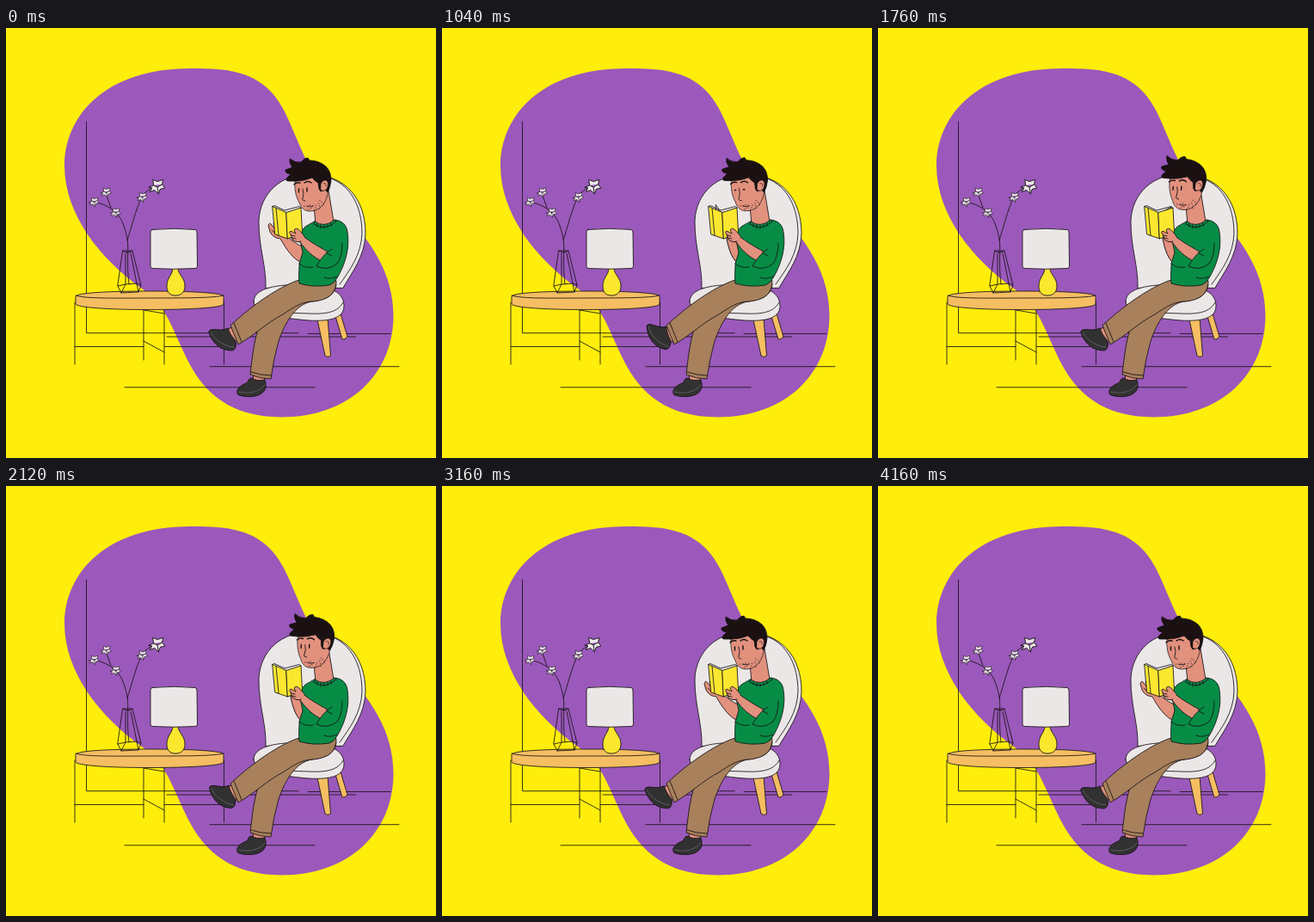
An HTML page that plays this animation: 500x500 px, repeating every 5040 ms.

```html
<!DOCTYPE html>
<html lang="en">
<head>
<meta charset="utf-8">
<title>Reading chair</title>
<style>
  html, body { margin: 0; height: 100%; overflow: hidden; background: #ffed0b; }
  svg { display: block; width: 100%; height: 100%; stroke: #161216; stroke-width: .85; stroke-linejoin: round; stroke-linecap: round; fill: none; }
  .white { fill: #ebe7e7; }
  .wood { fill: #f5be62; }
  .yellow { fill: #fbe72e; }
  .skin { fill: #e2917d; }
  .green { fill: #078c46; }
  .brown { fill: #a8805c; }
  .shoe { fill: #323132; }
  .hair { fill: #1b1112; }
</style>
</head>
<body>
<svg viewBox="0 0 500 500">
  <path fill="#9b59bb" stroke="none" d="M68 160C68 105 112 47 215 47C240 47 254 48 266 51C301 59 317 80 329 108C347 149 355 174 386 207C425 248 450.500 285 450.500 335C450 402 400 452.500 320 452.500C262 452 231 426 211 386C190 342 187 325 158 303C110 269 68 217 68 160Z"/>

  <!-- room lines -->
  <path d="M93.500 109V354.700H340M351 355.500H447M187 359H407M237 393.700H457M138 417.800H359"/>

  <!-- table -->
  <path d="M80 319V391M160 327V386M184 326V391M253.500 319V391M80 370.500H160M184 370.500H253.500M160 364L184 377M160 328L184 332"/>
  <path class="wood" d="M81 312C81 308 118 306 167 306S253 308 253 312V321C253 325 215 327.500 167 327.500S81 325 81 321Z"/>
  <path d="M81 311C92 315 130 314 167 314S243 314 253 311"/>

  <!-- vase and twigs -->
  <path d="M143 298C140 275 143 255 141 245C138 230 134 220 127 214C119 207 111 204 102 202M122 209L116 192M141 247C146 231 151 211 158 196C161 191 167 187 174 184"/>
  <path d="M136 259H147L157 299L154 307L134 308L130 300ZM136 259Q141 263 147 259M139 262L139 298L134 308M145 262L152 297L154 307M130 300L139 298L152 297L157 299"/>
  <g id="blooms" class="white"></g>

  <!-- lamp -->
  <path class="yellow" d="M194 279H200C200 287 208 290 208 300C208 308 203 311 197 311S187 308 187 300C187 290 194 287 194 279Z"/>
  <path class="white" d="M170 234.500Q195 232 220 234.500Q222 235 222 238L222.500 277Q222.500 279 220 279.500Q195 281 170 279.500Q168 279 168 277L168 237Q168 235 170 234.500Z"/>

  <!-- chair -->
  <path class="wood" d="M383 335L391 362Q394 363 397 359L389 332ZM362 339L371 381Q374 384 377.500 381L374 337Z"/>
  <path class="white" d="M302 302C303 278 294 256 294 226C294 200 312 171 352 170C394 170 418 198 418 239C417 266 403 283 392 302Z"/>
  <path d="M378 175C402 184 414 209 414 239C413 264 400 281 388 298"/>
  <path class="white" d="M288 318C288 304 310 298.500 340 298.500C372 298.500 393 305 393 323C393 337 378 341.500 352 340C326 338 288 333 288 318Z"/>
  <path d="M289 321C302 333 332 331 352 332C374 333 386 330 392 319"/>

  <!-- legs -->
  <path class="skin" d="M288 402L287 412H300L301 404Z"/>
  <path class="shoe" d="M269 422C270 416 278 414 281 412Q282 407 286 407Q291 411 301 409C303 415 303 421 297 425C290 430 278 429 271 427Q268 426 269 422Z"/>
  <path d="M270 423C281 426 294 424 301 415" stroke="#777" stroke-width=".6"/>
  <path class="brown" d="M384 298C383 311 372 316 356 318C336 321 324 344 317 364Q311 385 308 408Q295 408 284 403C287 376 290 349 301 333C313 316 330 306 348 298Z"/>
  <path d="M285 400Q296 404 308 404"/>
  <g id="foot">
    <path class="skin" d="M265 347L256 351L263 367L272 363Z"/>
    <path class="shoe" d="M236 353C237 349 244 351 249 351Q255 351 258 349Q260 356 267 364C268 370 267 374 263 375C253 375 246 371 241 364Q236 357 236 353Z"/>
    <path d="M238 354C244 364 254 370 265 371" stroke="#777" stroke-width=".6"/>
  </g>
  <path class="brown" d="M341 293C324 298 293 316 261 346L270 368C288 358 304 342 322 333C335 324 345 318 357 318C374 316 384 310 384 294Z"/>
  <path d="M265 343L274 365"/>

  <!-- body -->
  <g id="arm">
    <path class="skin" d="M345 273C335 271 325 256 319 245Q310 244 307 237L305 230Q306 225 309 229L313 234L311 227Q315 225 318 232L323 237C330 246 338 252 347 255Z"/>
    <path d="M309 235Q313 240 318 239"/>
  </g>
  <path class="skin" d="M358 207L360 228Q371 236 381 225L375 189Z"/>
  <path class="green" d="M359 225Q370 233 382 223C391 224 396 229 397 237C400 255 395 273 386 289Q382 297 376 299Q357 302 341 297C340 287 341 281 341 274L345 261L342 247Q341 237 348 231Z"/>
  <path d="M358 228Q371 237 384 225M359 225L358 228M382 223L384 225M362 228V231M366 229V233M370 230V233M374 229V232M378 227V230"/>
  <path class="skin" d="M374 260C361 253 350 246 343 240L340 234Q336 232 335 236L330 235Q328 238 331 241L333 245Q337 249 342 249C350 260 357 266 367 271Z"/>
  <path class="green" d="M379 257C372 261 366 268 361 277Q374 283 385 274Q391 266 391 250"/>
  <path d="M341 274Q348 280 357 278M372 261L379 265M385 289Q377 293 370 290"/>

  <!-- book -->
  <path id="page" class="white"/>
  <path class="yellow" d="M310 207.500L326 214.500L327.500 245L313 240Z"/>
  <path class="yellow" d="M326 214.500L343 209L344.500 238L327.500 245Z"/>
  <path d="M310 207.500L312 206.500L324 212L341 207.500L343 209M314 209.500L317 241"/>
  <path class="skin" d="M347 242L342 236Q337 231 335 235L337 239L331 236Q328 237 331 240L333 246Q338 250 343 248"/>
  <path d="M331 241L336 242M332 244L337 245"/>

  <!-- head -->
  <g id="head">
    <path class="skin" stroke-width=".7" d="M336 176C335 187 337 196 341 203C343 209 347 213 353 213C364 213 371 206 374 193L373 171L350 165Z"/>
    <path class="hair" d="M337 178L329 178Q324 178 327 174L331 170Q324 169 325 165L333 162Q329 157 330 152Q336 157 343 156Q347 151 351 151L353 154Q364 154 372 161Q378 167 378 177Q377 186 374 191L371 188L366 190L364 187L363 180Q359 178 356 174Q346 178 337 178Z"/>
    <path class="skin" stroke-width=".7" d="M366 181C369 175 375 176 374.500 182C374 189 369 191 366 188Z"/>
    <path d="M369 181Q373 179 372 184" stroke-width=".6"/>
    <path d="M335 182Q338 179 342 180M347 180Q351 177 355 180" stroke-width="1.4"/>
    <path d="M345 187Q347 193 345 198Q344 201 348 201"/>
    <path d="M350 207.500Q353 208.500 357 207"/>
    <path id="eyes" stroke-width="1.4"/>
    <path id="stubble" stroke-width=".7"/>
  </g>
</svg>
<script>
const LOOP = 5040;
const el = id => document.getElementById(id);
const clamp = x => Math.max(0, Math.min(1, x));
const ease = (t, a, b) => { const x = clamp((t - a) / (b - a)); return x * x * (3 - 2 * x); };
const hold = (t, a, b, c, d) => ease(t, a, b) - ease(t, c, d);
const turn = (id, angle, x, y) => el(id).setAttribute('transform', `rotate(${angle} ${x} ${y})`);

// Ragged cotton flowers at the twig tips
const petals = 'M-8 1L-3 -1L-4 -7L1 -5L7 -7L6 -2L9 2L4 3L2 8L-2 4L-7 6L-5 2ZM-3 -1L1 1L6 -2M1 1L2 8';
el('blooms').innerHTML = [[175, 184, 1.1], [158, 196.5, .72], [116, 191, .7], [102, 202, .68], [127, 214.500, .7]]
  .map(([x, y, s]) => `<path transform="translate(${x} ${y}) scale(${s})" d="${petals}"/>`).join('');

let dots = '';
for (let i = 0; i < 15; i++) {
  const a = 2.5 - i * .17, r = 12 - (i % 3) * 2.5;
  dots += `M${357 + r * 1.1 * Math.cos(a)} ${200 + r * Math.sin(a)}h.6`;
}
el('stubble').setAttribute('d', dots);

function draw(t) {
  turn('head', 5 * hold(t, 920, 1400, 2400, 3120), 372, 218);
  turn('arm', 21 * hold(t, 560, 920, 2280, 2680), 343, 271);

  const beat = t > 40 && t < 3400 ? (1 - Math.cos((t - 40) / 840 * Math.PI)) / 2 : 0;
  turn('foot', 15 * beat ** 1.5, 267, 360);

  const p = clamp((t - 840) / 960);
  const x = 312 + 30 * p, y = 208.5 - 5 * Math.sin(p * Math.PI);
  el('page').setAttribute('d', p > 0 && p < 1 ? `M326 217L${x} ${y}L${x + 1} 230L328 244Z` : '');

  const shut = t > 960 && t < 1120;
  el('eyes').setAttribute('d', shut ? 'M340 189h1.500M350 188h1.500' : 'M340.500 187v4M350 186v4');
}

function tick(now) {
  draw(now % LOOP);
  requestAnimationFrame(tick);
}
draw(0);
requestAnimationFrame(tick);
</script>
</body>
</html>
```
